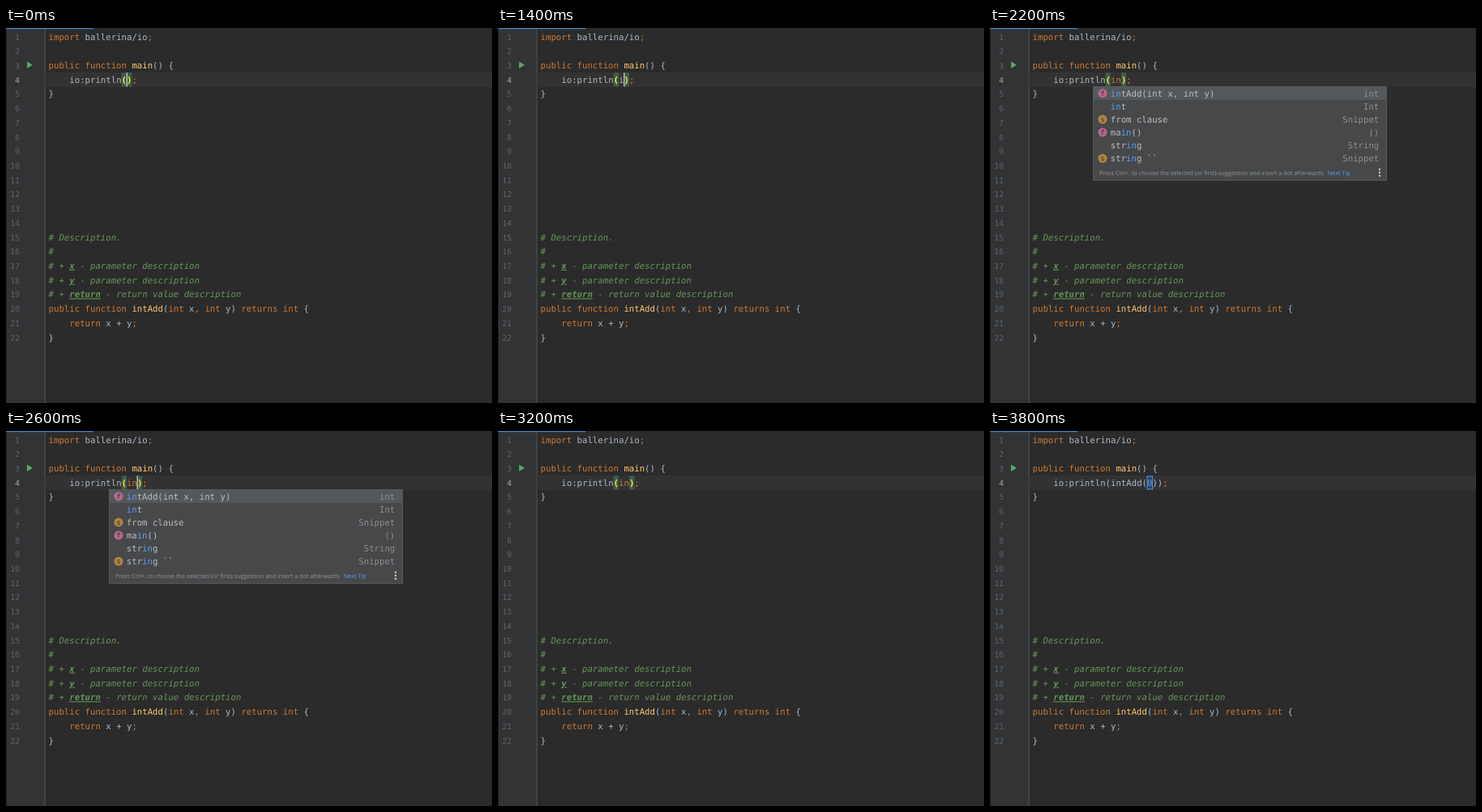
An HTML page for the animation above (4 s loop, 600 px wide and 464 px high).

```html
<!DOCTYPE html>
<html lang="en">
<head>
<meta charset="utf-8">
<title>Code completion</title>
<style>
  html, body { margin: 0; width: 100%; height: 100%; overflow: hidden; background: #2b2b2b; }
  svg { display: block; }
  text {
    font: 10.68px "DejaVu Sans Mono", monospace;
    white-space: pre;
    text-rendering: geometricPrecision;
  }
  .t { fill: #a9b7c6; }
  .k { fill: #cc7832; }
  .f { fill: #ffc66d; }
  .c { fill: #629755; font-style: italic; }
  .d { fill: #629755; font-style: italic; font-weight: bold; text-decoration: underline; }
  .p { fill: #ffef28; font-weight: bold; }
  .n { fill: #6897bb; }
  .w { fill: #bbbdbf; }
  .m { fill: #589df6; }
  .r { fill: #8c8e90; text-anchor: end; }
  .num { fill: #606366; font-size: 9.8px; text-anchor: end; }
  .now { fill: #a4a3a3; }
  .icon { fill: #2f3133; font-size: 8.5px; text-anchor: middle; }
  .tip { font: 7.27px "Open Sans", sans-serif; }
</style>
</head>
<body>
<svg id="stage" width="600" height="464" viewBox="0 0 600 464"></svg>
<script>
const LOOP = 4000, LEFT = 52.6, CHAR = 6.43, LINE = 17.71;
const stage = document.getElementById('stage');
const colX = col => LEFT + col * CHAR;
const baseY = row => 14.6 + (row - 1) * LINE;

function add(parent, tag, attrs, content) {
  const el = document.createElementNS('http://www.w3.org/2000/svg', tag);
  for (const key in attrs) el.setAttribute(key, attrs[key]);
  if (content !== undefined) el.textContent = content;
  parent.appendChild(el);
  return el;
}

const rect = (parent, x, y, width, height, fill, more) =>
  add(parent, 'rect', { x, y, width, height, fill, ...more });

// parts: class, string, class, string, ...
function write(parent, x, y, parts) {
  const el = add(parent, 'text', { x, y });
  for (let i = 0; i < parts.length; i += 2) add(el, 'tspan', { class: parts[i] }, parts[i + 1]);
  return el;
}

// Editor
rect(stage, 0, 0, 600, 464, '#2b2b2b');
rect(stage, 0, 0, 48, 464, '#313335');
rect(stage, 0, 0, 1, 464, '#242628');
rect(stage, 47.5, 0, 1, 464, '#515355');
rect(stage, 48.5, 55, 551.5, 18, '#323232');
rect(stage, 0, 0, 108, 1.2, '#4a88c7');
add(stage, 'path', { d: 'M26 41.6 33 45.8 26 50Z', fill: '#5aa65f' });

for (let row = 1; row <= 22; row++)
  add(stage, 'text', { x: 17, y: baseY(row), class: row === 4 ? 'num now' : 'num' }, row);

const code = [
  [1, 0, 'k', 'import', 't', ' ballerina/io', 'k', ';'],
  [3, 0, 'k', 'public function ', 'f', 'main', 't', '() {'],
  [5, 0, 't', '}'],
  [15, 0, 'c', '# Description.'],
  [16, 0, 'c', '#'],
  [17, 0, 'c', '# + ', 'd', 'x', 'c', ' - parameter description'],
  [18, 0, 'c', '# + ', 'd', 'y', 'c', ' - parameter description'],
  [19, 0, 'c', '# + ', 'd', 'return', 'c', ' - return value description'],
  [20, 0, 'k', 'public function ', 'f', 'intAdd', 't', '(', 'k', 'int', 't', ' x', 'k', ', int',
    't', ' y) ', 'k', 'returns int', 't', ' {'],
  [21, 4, 'k', 'return', 't', ' x + y', 'k', ';'],
  [22, 0, 't', '}'],
];
for (const [row, col, ...parts] of code) write(stage, colX(col), baseY(row), parts);

// Line being typed
const call = ['t', 'io:println'];

function typedLine(arg, cls) {
  const g = add(stage, 'g', {});
  const close = 15 + arg.length;
  for (const col of [14, close]) rect(g, colX(col), 55.3, CHAR, 17.2, '#3f5a4b');
  write(g, colX(4), baseY(4), [...call, 'p', '(', cls, arg, 'p', ')', 'k', ';']);
  return g;
}

function finishedLine() {
  const g = add(stage, 'g', {});
  rect(g, colX(22), 56, CHAR, 16, '#214283', { stroke: '#5b95d6', 'stroke-width': 1 });
  write(g, colX(4), baseY(4), [...call, 't', '(intAdd(', 'n', '0', 't', '))', 'k', ';']);
  return g;
}

const lines = {
  empty: typedLine('', 't'),
  i: typedLine('i', 't'),
  in: typedLine('in', 't'),
  keyword: typedLine('in', 'k'),
  done: finishedLine(),
};
const caret = rect(stage, 0, 55.3, 1.3, 17.2, '#c8c8c8');

// Suggestions
const popup = add(stage, 'g', {});
rect(popup, 127.5, 72.5, 362, 116, '#46484a', { stroke: '#56595b' });
rect(popup, 128, 73, 361, 16, '#55585b');

const pink = '#b5688a', amber = '#b0833f';
const items = [
  ['f', pink, 'int', 'm', 'in', 'w', 'tAdd(int x, int y)'],
  ['', '', 'Int', 'm', 'in', 'w', 't'],
  ['s', amber, 'Snippet', 'w', 'from clause'],
  ['f', pink, '()', 'w', 'ma', 'm', 'in', 'w', '()'],
  ['', '', 'String', 'w', 'str', 'm', 'in', 'w', 'g'],
  ['s', amber, 'Snippet', 'w', 'str', 'm', 'in', 'w', 'g ``'],
];
items.forEach(([icon, color, type, ...parts], i) => {
  const y = 80.8 + i * 16.1;
  if (icon) {
    add(popup, 'circle', { cx: 139, cy: y, r: 5.6, fill: color });
    add(popup, 'text', { x: 139, y: y + 2.8, class: 'icon' }, icon);
  }
  write(popup, 148.8, y + 3.7, parts);
  add(popup, 'text', { x: 480.3, y: y + 3.7, class: 'r' }, type);
});
add(popup, 'text', { x: 135, y: 181.6, class: 'tip', fill: '#929496' },
  'Press Ctrl+. to choose the selected (or first) suggestion and insert a dot afterwards');
add(popup, 'text', { x: 416.8, y: 181.6, class: 'tip m' }, 'Next Tip');
for (const y of [174.8, 178.8, 182.8]) add(popup, 'circle', { cx: 481, cy: y, r: 1.2, fill: '#c8cacc' });

// start, line, caret column (0 hides it), popup
const steps = [
  [0, 'empty', 15, false],
  [400, 'empty', 0, false],
  [1000, 'empty', 15, false],
  [1200, 'i', 16, false],
  [1600, 'in', 17, false],
  [1800, 'keyword', 17, false],
  [2200, 'keyword', 0, true],
  [2600, 'keyword', 17, true],
  [3200, 'keyword', 0, false],
  [3400, 'done', 0, false],
];

const show = (el, on) => el.setAttribute('visibility', on ? 'visible' : 'hidden');

function draw(time) {
  const [, name, col, open] = steps.findLast(step => step[0] <= time);
  for (const key in lines) show(lines[key], key === name);
  show(caret, col > 0);
  caret.setAttribute('x', colX(col) - 0.4);
  show(popup, open);
}

const start = performance.now();
function tick() {
  draw((performance.now() - start) % LOOP);
  requestAnimationFrame(tick);
}
tick();
</script>
</body>
</html>
```
